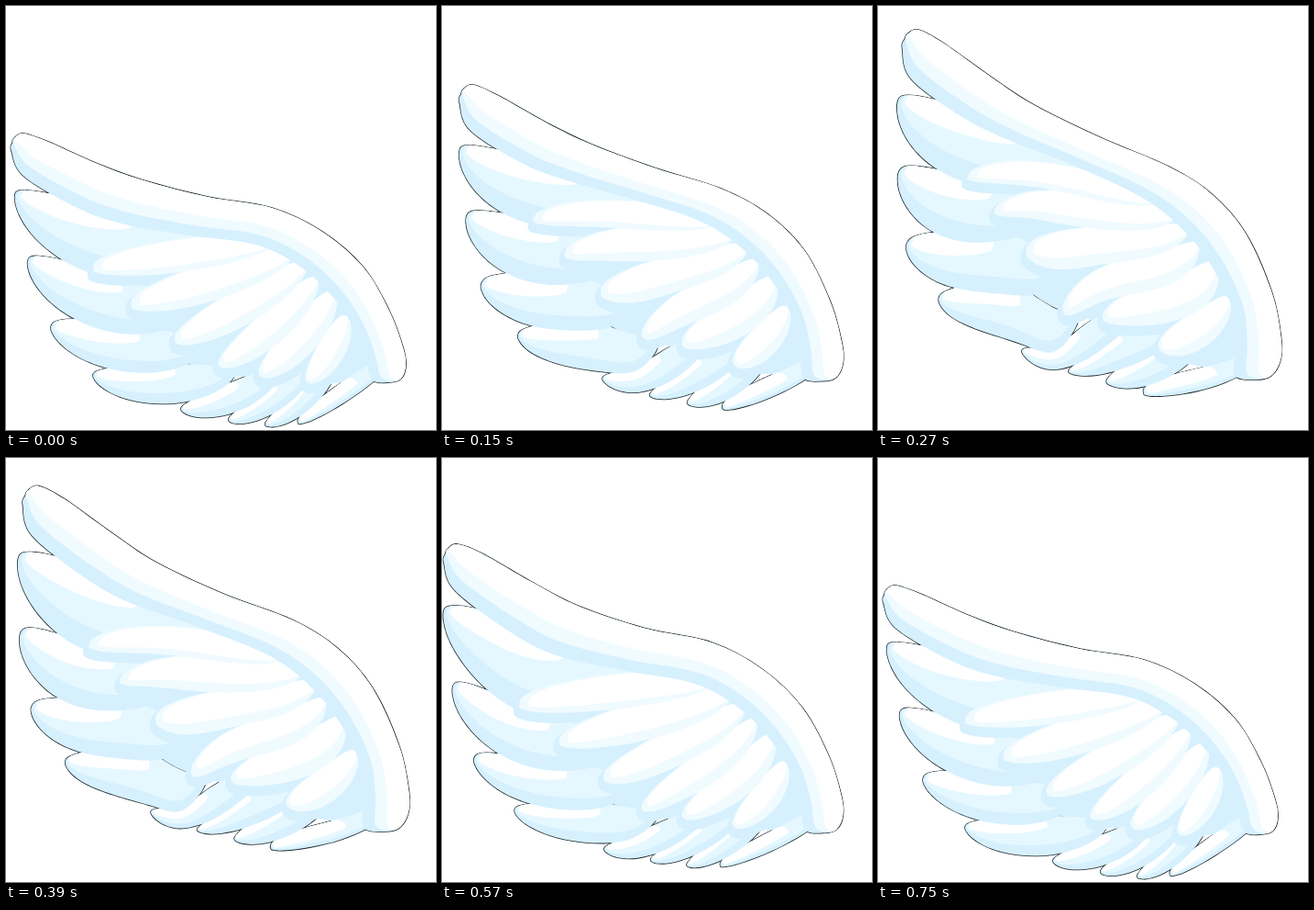
These frames come from a looping animation (469x462 px, 780 ms). An HTML page with a canvas:

```html
<!DOCTYPE html>
<html lang="en">
<head>
<meta charset="utf-8">
<title>Wing</title>
<style>
  html, body { margin: 0; width: 100%; height: 100%; overflow: hidden; background: #fff; }
  canvas { display: block; }
</style>
</head>
<body>
<canvas id="stage" width="469" height="462"></canvas>
<script>
const ctx = document.getElementById('stage').getContext('2d');
const LOOP = 780, STEP = 30;
const DEEP = '#d6f0fe', MID = '#e6f8ff', PALE = '#f0fbff', WHITE = '#fff', INK = '#1c262c';

// Handles that bend the wing: x,y at rest, raised, and swept on the way down.
const handles = [
  [19,139, 44,26, 17,94],
  [46,206, 62,104, 40,167],
  [150,190, 172,109, 148,161],
  [290,220, 317,175, 294,201],
  [388,283, 399,245, 391,270],
  [436,395, 438,390, 437,393],
  [399,407, 389,402, 396,405],
  [295,268, 308,222, 298,255],
  [10,207, 22,104, 2,168],
  [49,347, 32,256, 35,325],
  [95,404, 66,320, 79,385],
  [191,440, 157,377, 177,427],
  [226,419, 192,374, 209,411],
  [243,452, 208,399, 228,439],
  [319,456, 290,424, 304,446],
  [95,289, 97,189, 84,272],
  [185,366, 162,270, 177,350],
  [278,403, 247,342, 264,392],
  [368,340, 378,320, 371,334]
];

// Thin-plate spline through the handle displacements.
const basis = (x, y) => [...handles.map(([hx, hy]) => {
  const d = (x - hx) ** 2 + (y - hy) ** 2;
  return d ? d * Math.log(d) : 0;
}), 1, x, y];

function solve(rows) {
  const n = rows.length;
  for (let c = 0; c < n; c++) {
    let best = c;
    for (let r = c + 1; r < n; r++) if (Math.abs(rows[r][c]) > Math.abs(rows[best][c])) best = r;
    [rows[c], rows[best]] = [rows[best], rows[c]];
    const pivot = rows[c][c];
    rows[c] = rows[c].map(v => v / pivot);
    for (let r = 0; r < n; r++) {
      const f = rows[r][c];
      if (r !== c && f) rows[r] = rows[r].map((v, j) => v - f * rows[c][j]);
    }
  }
  return rows.map(row => row.slice(n));
}
const field = solve([
  ...handles.map(([x, y, ux, uy, dx, dy]) => [...basis(x, y), ux - x, uy - y, dx - x, dy - y]),
  ...[() => 1, h => h[0], h => h[1]].map(f => [...handles.map(f), ...Array(7).fill(0)])
]);

// A rest point together with its raise and sweep displacements.
function pin([x, y]) {
  const b = basis(x, y);
  const move = k => b.reduce((sum, v, i) => sum + v * field[i][k], 0);
  return [x, y, move(0), move(1), move(2), move(3)];
}

const mix = (a, b, f) => [a[0] + (b[0] - a[0]) * f, a[1] + (b[1] - a[1]) * f];

// Feather from tip to base: full blunt upper edge, tapering lower edge.
function blade(tip, base, top, belly) {
  const n = 28, len = Math.hypot(base[0] - tip[0], base[1] - tip[1]);
  const nx = (tip[1] - base[1]) / len, ny = (base[0] - tip[0]) / len;
  return Array.from({ length: n }, (_, k) => {
    const a = 2 * Math.PI * k / n, s = Math.sin(a);
    const off = s > 0 ? -top * s ** 0.7 : belly * (-s) ** 1.25;
    const [x, y] = mix(tip, base, (1 - Math.cos(a)) / 2);
    return pin([x + nx * off, y + ny * off]);
  });
}

function feather([tx, ty, bx, by, top, belly]) {
  const tip = [tx, ty], base = [bx, by];
  return {
    edge: blade(tip, base, top, belly),
    mid: blade(mix(tip, base, 0.015), mix(tip, base, 0.94), top * 1.5, belly * 0.64),
    light: blade(mix(tip, base, 0.03), mix(tip, base, 0.58), top * 1.5, belly * 0.22)
  };
}

function leaf([tx, ty, bx, by, top, belly]) {
  const tip = [tx, ty], base = [bx, by];
  return {
    edge: blade(tip, base, top, belly),
    light: blade(mix(tip, base, 0.05), base, top * 0.95, belly * 0.5)
  };
}

// Each row: tip x,y, base x,y, upper and lower half width.
const feathers = [
  [319,455, 430,378, 10, 10],
  [283,457, 360,385, 5, 20],
  [243,452, 335,390, 6, 21],
  [191,440, 300,395, 7, 25],
  [95,403, 250,400, 11, 32],
  [49,350, 215,375, 16, 36],
  [24,277, 200,335, 14, 47],
  [10,205, 230,265, 13, 62]
].map(feather);
const leaves = [
  [330,411, 372,338, 12, 19],
  [278,404, 359,312, 14, 24],
  [233,393, 340,297, 13, 24],
  [185,367, 328,284, 18, 22],
  [137,328, 314,271, 21, 21],
  [95,288, 290,261, 21, 15]
].map(leaf);

// Upper and lower border of the arm, paired from tip to root.
const upper = [[9,144], [19,139], [46,148], [100,172], [150,190], [220,208], [290,220],
  [345,246], [390,285], [418,332], [433,372], [436,392], [431,406]];
const lower = [[7,149], [6,158], [20,186], [80,221], [130,238], [200,250], [272,260],
  [318,282], [352,312], [377,346], [391,380], [399,407], [418,410]];
const band = f => [...upper, ...upper.map((p, i) => mix(p, lower[i], f)).reverse()].map(pin);
const arm = { edge: band(1), mid: band(0.74), light: band(0.49) };

const body = [[60,205], [130,225], [220,240], [290,250], [350,295], [388,350], [400,398],
  [345,412], [270,405], [200,390], [120,345], [80,270]].map(pin);

const times = [0, 150, 270, 390, 450, 570, 750];
const raiseKeys = [0, 0.585, 1, 0.72, 0.33, 0, 0];
const sweepKeys = [0, -0.29, 0, 0.6, 1, 1, 0];

// Smooth curve through the keys, resting for one step at the seam.
function curve(keys, t) {
  const T = [-STEP, ...times, LOOP], V = [keys[0], ...keys, keys[0]];
  let i = 1;
  while (i < times.length - 1 && t >= T[i + 1]) i++;
  const span = T[i + 1] - T[i], u = Math.min(1, (t - T[i]) / span);
  const slope = k => (V[k + 1] - V[k - 1]) / (T[k + 1] - T[k - 1]) * span;
  return V[i] + (V[i + 1] - V[i]) * u * u * (3 - 2 * u)
    + slope(i) * u * (1 - u) ** 2 - slope(i + 1) * u * u * (1 - u);
}

let raise = 0, sweep = 0;

function trace(pins) {
  const pts = pins.map(([x, y, ux, uy, dx, dy]) =>
    [x + raise * ux + sweep * dx, y + raise * uy + sweep * dy]);
  const n = pts.length, path = new Path2D();
  path.moveTo(...pts[0]);
  for (let i = 0; i < n; i++) {
    const a = pts[(i + n - 1) % n], b = pts[i], c = pts[(i + 1) % n], d = pts[(i + 2) % n];
    path.bezierCurveTo(
      b[0] + (c[0] - a[0]) / 6, b[1] + (c[1] - a[1]) / 6,
      c[0] - (d[0] - b[0]) / 6, c[1] - (d[1] - b[1]) / 6, c[0], c[1]);
  }
  path.closePath();
  return path;
}

function fill(path, color) {
  ctx.fillStyle = color;
  ctx.fill(path);
}

function stroke(path, color, width) {
  ctx.strokeStyle = color;
  ctx.lineWidth = width;
  ctx.stroke(path);
}

function paint(part, base, middle) {
  const edge = trace(part.edge);
  fill(edge, base);
  ctx.save();
  ctx.clip(edge);
  if (part.mid) fill(trace(part.mid), middle);
  fill(trace(part.light), WHITE);
  ctx.restore();
}

function draw(t) {
  raise = curve(raiseKeys, t);
  sweep = curve(sweepKeys, t);
  ctx.fillStyle = WHITE;
  ctx.fillRect(0, 0, 469, 462);
  ctx.lineJoin = 'round';

  [...feathers, arm].forEach(p => stroke(trace(p.edge), INK, 1.6));
  fill(trace(body), DEEP);
  feathers.forEach(p => paint(p, DEEP, MID));

  ctx.save();
  ctx.translate(-1, 6);
  leaves.forEach(p => {
    const halo = trace(p.edge);
    fill(halo, DEEP);
    stroke(halo, DEEP, 10);
  });
  ctx.restore();
  leaves.forEach(p => paint(p, PALE));
  paint(arm, DEEP, PALE);
}

const start = performance.now();
function tick() {
  const t = (performance.now() - start) % LOOP;
  draw(Math.floor(t / STEP) * STEP);
  requestAnimationFrame(tick);
}
tick();
</script>
</body>
</html>
```
